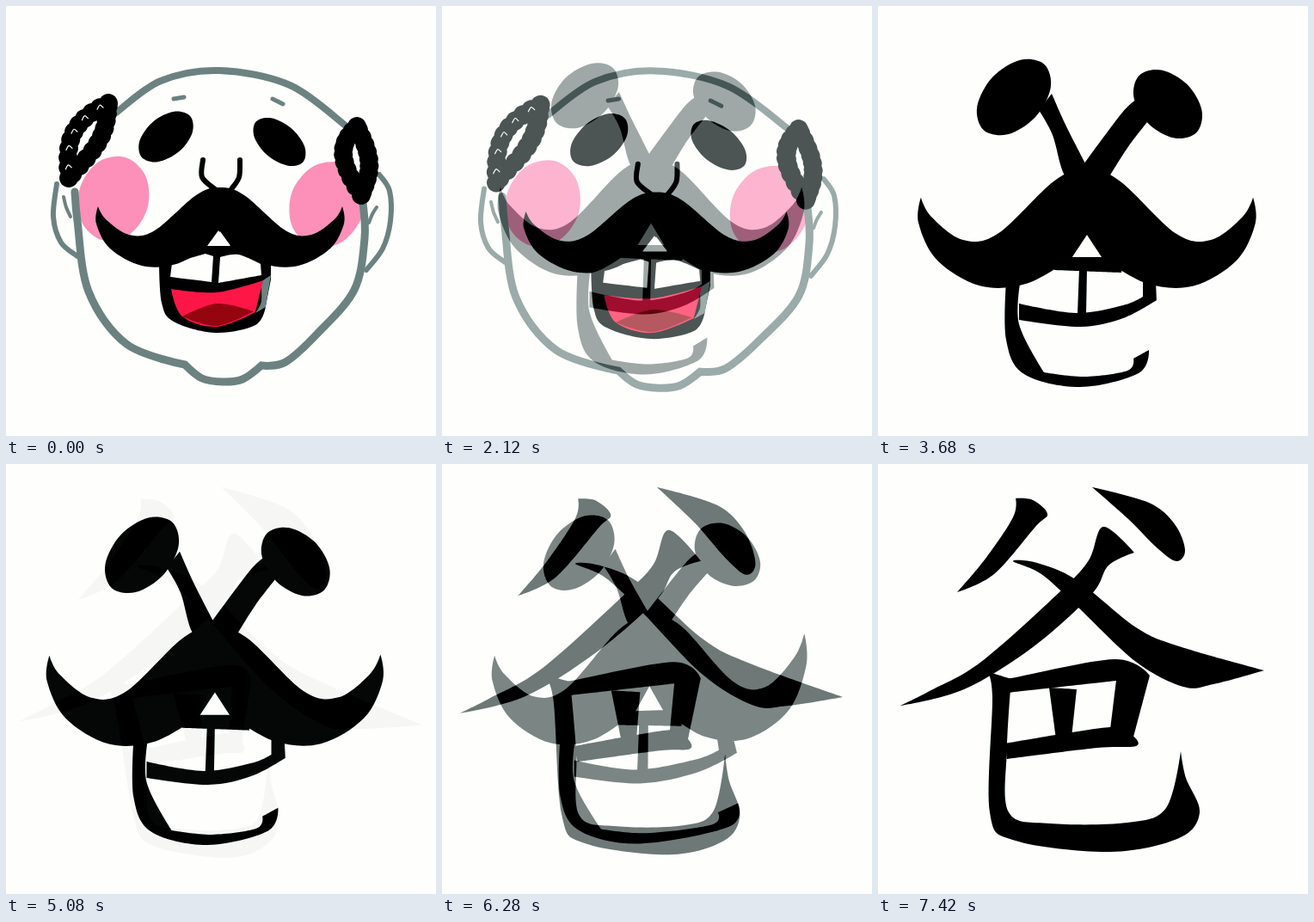
Animation, 500 px wide and 500 px high, one loop 8.82 s. Source, as an HTML page:

```html
<!DOCTYPE html>
<html lang="en">
<head>
<meta charset="utf-8">
<title>Face to character morph</title>
<style>
html, body { margin: 0; width: 100%; height: 100%; overflow: hidden; background: #fefefc; }
svg { display: block; width: 100vw; height: 100vh; }
.tint { fill: rgb(107, 128, 128); mix-blend-mode: soft-light; }
</style>
</head>
<body>
<svg id="stage" viewBox="0 0 500 500"></svg>
<script>
const PAPER = '#fefefc', INK = '#000', GRAY = '#768280', PINK = '#fc90b9';
const STEP = 60, LOOP = 8820, MORPH_A = 1400, MORPH_B = 5080;
const clamp = (v, lo, hi) => Math.min(hi, Math.max(lo, v));

// Key points are "x,y"; a trailing "!" makes a corner
const parse = text => text.split(' ').map(p => {
  const [x, y] = p.split(',');
  return [+x, parseFloat(y), p.endsWith('!')];
});
const shape = (points, closed, attrs) => ({ points, closed, attrs });
const blob = (color, text) => shape(parse(text), true, { fill: color });
const line = (color, width, text) => shape(parse(text), false, {
  fill: 'none', stroke: color, 'stroke-width': width, 'stroke-linecap': 'round'
});
function oval(color, cx, cy, rx, ry = rx, degrees = 0) {
  const turn = degrees * Math.PI / 180, c = Math.cos(turn), s = Math.sin(turn);
  const points = Array.from({ length: 8 }, (_, i) => {
    const x = rx * Math.cos(i * Math.PI / 4), y = ry * Math.sin(i * Math.PI / 4);
    return [cx + x * c - y * s, cy + x * s + y * c];
  });
  return shape(points, true, { fill: color });
}

// Two rows of curls along a bent line, widest in the middle
function hair(a, b, c, loops) {
  const bend = (s, k) => (1 - s) ** 2 * a[k] + 2 * s * (1 - s) * b[k] + s * s * c[k];
  const curls = [], rings = [];
  for (let i = 0; i <= 20; i++) {
    const s = i / 20, out = (i % 2 ? 1 : -1) * 15 * Math.sin(Math.PI * s);
    const x = bend(s, 0) + out, y = bend(s, 1) + out * 0.3;
    curls.push(oval(INK, x, y, 11));
    if (loops && i % 4 === 2) rings.push(line(PAPER, 1.2, `${x - 3},${y + 2} ${x},${y - 3} ${x + 4},${y}`));
  }
  return [...curls, ...rings];
}

// One half is drawn, the other mirrored
function mustache(cx, cy, sx, sy) {
  const half = parse('28,9 76,50 106,55 133,37 142,22! 144,42 128,71 91,91 51,89 13,69!');
  const side = dir => half.map(([x, y, corner]) => [cx + dir * x * sx, cy + y * sy, corner]);
  const top = [cx, cy], notch = [cx, cy + 51 * sy, true];
  return shape([top, ...side(1), notch, ...side(-1).reverse()], true, { fill: INK });
}

const face = [
  oval(PINK, 125, 224, 41, 50, 15),
  oval(PINK, 373, 231, 43, 51, 20),
  line(GRAY, 8, '128,124 180,87 248,75 330,92 396,140'),
  line(GRAY, 9, '80,216 83,250 96,332 140,393 208,417! 228,433 252,437 275,434 297,418! 325,414 362,381 405,330 417,270 415,228'),
  line(GRAY, 6, '59,207 55,245 64,275 83,291'),
  line(GRAY, 6, '434,196 446,215 447,250 438,282 419,307'),
  line(GRAY, 4, '67,222 70,234 75,245'),
  line(GRAY, 4, '431,234 426,242 422,252'),
  ...hair([119, 113], [92, 145], [73, 200], true),
  ...hair([408, 140], [404, 175], [413, 220]),
  line(GRAY, 5, '195,108 207,106'),
  line(GRAY, 5, '310,108 322,114'),
  oval(INK, 186, 152, 37, 23, -40),
  oval(INK, 318, 158, 36, 21, 40),
  line(INK, 6, '229,179 228,199 243,213'),
  line(INK, 6, '272,179 271,199 262,213'),
  blob(INK, '178,296! 181,345 195,367 243,380 290,371 302,349! 308,318! 308,300! 262,278! 232,278!'),
  blob(GRAY, '296,321! 308,313! 302,350! 290,357! 297,343'),
  blob('#fe1646', '192,329! 245,333 299,319! 290,356! 245,373 205,361'),
  blob('#9f0510', '205,361! 245,346 288,355! 245,372'),
  blob(PAPER, '193,299! 232,288! 241,291! 239,321! 191,315!'),
  blob(PAPER, '249,292! 270,289 296,300! 297,313! 247,322!'),
  mustache(249, 211, 1, 1),
  blob(PAPER, '247,261! 261,279! 234,279!')
];

const bugHead = [
  oval(INK, 158, 106, 52, 34, -47),
  oval(INK, 337, 114, 47, 32, 45),
  blob(INK, '187,121! 202,102! 219,140 241,183! 241,215! 217,197 203,150'),
  blob(INK, '240,183! 284,124 302,108! 313,135! 290,165 268,200! 240,215!'),
  mustache(243, 190, 1.36, 1.49),
  blob(INK, '200,292! 285,292! 283,310! 205,307!')
];
const bugMouth = [
  blob(INK, '234,305! 243,305! 242,358! 232,358!'),
  blob(INK, '164,346! 230,357 285,348 308,338! 308,320! 323,320! 324,342! 285,363 235,373 164,365!'),
  blob(INK, '149,320! 166,317! 164,370 193,426! 240,431 290,424 297,410! 315,400! 303,427 235,443 170,428 149,388')
];

const glyphTop = [
  blob(INK, '160,40! 180,42 197,58 183,73 135,128 92,149! 125,110 157,62'),
  blob(INK, '249,27! 315,45 345,70 357,100 347,113 325,98 290,63'),
  blob(INK, '262,73 298,103! 268,118 248,152 180,213 100,262 26,281! 60,264 120,230 211,149 245,112'),
  blob(INK, '157,113 185,115 231,135 300,190 350,212 449,240! 390,256 355,259 300,230 232,166 190,128')
];
const glyphBox = [
  blob(INK, '126,241! 155,250! 150,330 152,405 200,418 290,417 335,400 352,334! 358,365 374,405 350,435 270,451 160,438 130,405 133,270'),
  blob(INK, '140,250! 155,249 275,227 316,246! 297,318! 270,310! 277,252! 150,266!'),
  blob(INK, '199,260! 231,262! 225,318! 207,320!'),
  blob(INK, '148,325! 270,306 295,315 300,328 255,330 150,343!')
];

// Warp rules: the full shift of a point on its way to the neighbouring picture
const faceToBug = (x, y) => [
  clamp(0.2 * (x - 248), -30, 30) * Math.min(1, y / 200),
  22 * Math.tanh((y - 66) / 150)
];
const bugToFace = (x, y) => [
  -0.14 * (x - 244),
  10 - 32 * Math.tanh((y - 50) / 120)
];
const headToGlyph = (x, y) => {
  const u = x - 240;
  return [-0.13 * u * Math.min(1, y / 225) - 3,
    -7 - 0.04 * u - (18 + 0.09 * u) * Math.exp(-(((y - 210) / 60) ** 2))];
};
const mouthToGlyph = (x, y) => {
  const u = x - 235;
  return [(u < 0 ? 0.15 : 0.5 * (y / 340) ** 3) * u - 9, -3 - 0.1 * Math.max(0, u)];
};
const topToBug = (x, y) => {
  const u = x - 225, right = Math.max(0, u);
  return [0.06 * u + right * right / 2250,
    0.075 * (y - 28) + 0.22 * right * clamp((y - 28) / 80, 0, 1)];
};
const boxToBug = (x, y) => {
  const u = x - 245;
  return [u > 0 ? -0.45 * u : -0.17 * u * clamp((y - 290) / 50, -1, 1), 7];
};

// Smooth curve through the key points
function curve(points, closed) {
  const n = points.length, at = i => points[closed ? (i + n) % n : clamp(i, 0, n - 1)];
  const handle = (i, sign) => {
    const [x, y, corner] = at(i), a = at(i - 1), b = at(i + 1), k = corner ? 0 : sign / 6;
    return `${x + k * (b[0] - a[0])},${y + k * (b[1] - a[1])}`;
  };
  let d = `M${points[0][0]},${points[0][1]}`;
  for (let i = 0; i < (closed ? n : n - 1); i++) {
    const [x, y] = at(i + 1);
    d += `C${handle(i, 1)} ${handle(i + 1, -1)} ${x},${y}`;
  }
  return d;
}

const stage = document.getElementById('stage');
function add(parent, name, attrs = {}) {
  const el = document.createElementNS('http://www.w3.org/2000/svg', name);
  for (const key in attrs) el.setAttribute(key, attrs[key]);
  return parent.appendChild(el);
}

function layer(...parts) {
  const group = add(stage, 'g');
  add(group, 'rect', { width: 500, height: 500, fill: PAPER });
  const items = parts.flatMap((shapes, part) =>
    shapes.map(s => ({ ...s, part, el: add(group, 'path', s.attrs) })));
  return (opacity, amount, ...rules) => {
    group.style.display = opacity ? '' : 'none';
    group.style.opacity = opacity;
    if (!opacity) return;
    for (const { el, points, closed, part } of items) {
      const rule = rules[part] || rules[0];
      const moved = points.map(([x, y, corner]) => {
        const [dx, dy] = rule(x, y);
        return [x + amount * dx, y + amount * dy, corner];
      });
      el.setAttribute('d', curve(moved, closed));
    }
  };
}
const showFace = layer(face), showBug = layer(bugHead, bugMouth), showGlyph = layer(glyphTop, glyphBox);
// Leans the middle greys to teal; black and white stay
add(stage, 'rect', { width: 500, height: 500, class: 'tint' });

const progress = (t, start, steps) => clamp((Math.floor((t - start) / STEP) + 1) / steps, 0, 1);

function draw(t) {
  const a = progress(t, MORPH_A, 39), b = progress(t, MORPH_B, 40);
  showFace(a < 1 ? 1 : 0, a, faceToBug);
  if (b > 0) showBug(b < 1 ? 1 : 0, b, headToGlyph, mouthToGlyph);
  else showBug(a, 1 - a, bugToFace);
  showGlyph(b, 1 - b, topToBug, boxToBug);
}

const begin = performance.now();
function tick() {
  draw((performance.now() - begin) % LOOP);
  requestAnimationFrame(tick);
}
tick();
</script>
</body>
</html>
```
